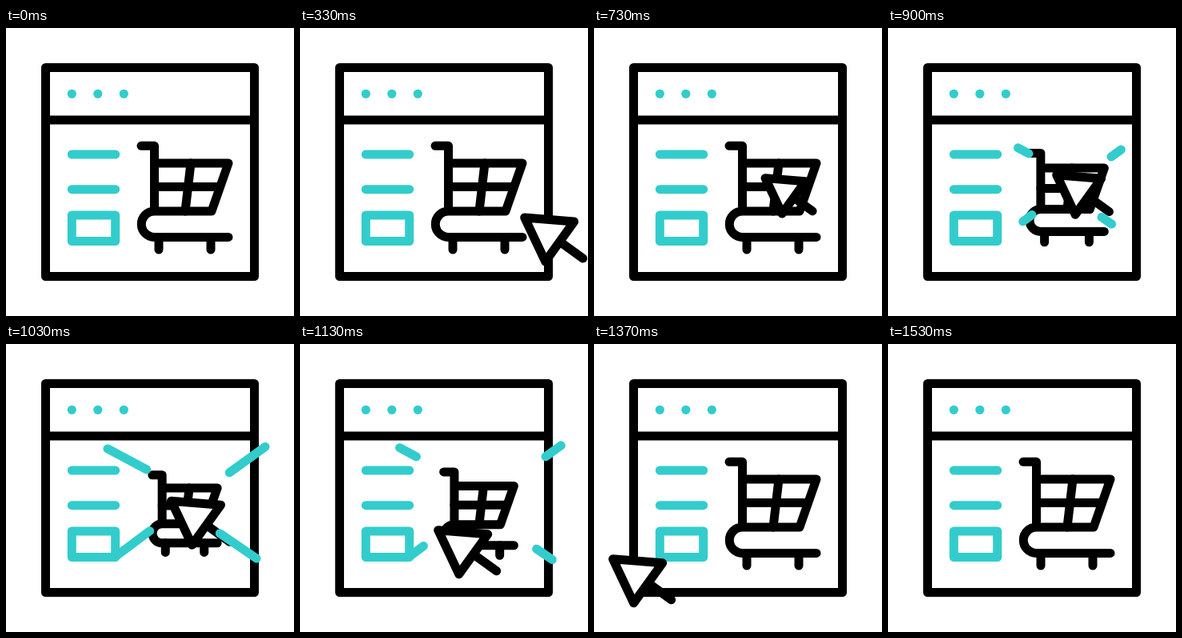
These frames come from a looping animation (360x360 px, 2000 ms). An HTML page:

```html
<!DOCTYPE html>
<html lang="en">
<head>
<meta charset="utf-8">
<title>Online shopping</title>
<style>
  html, body { margin: 0; width: 100%; height: 100%; overflow: hidden; background: #fff; }
  svg { display: block; width: 100%; height: 100%; }
  path, rect { fill: none; stroke: #000; stroke-width: 11; stroke-linecap: round; stroke-linejoin: round; }
  .accent path { stroke: #3cc; }
  circle { fill: #3cc; }
  #cursor path, #cart path { stroke-width: inherit; }
  #cursor .head { fill: #fff; }
</style>
</head>
<body>
<svg viewBox="0 0 360 360">
  <rect x="49.5" y="49.5" width="261" height="261"/>
  <path d="M49.5 115H310.5"/>
  <circle cx="82.3" cy="82.3" r="5.6"/>
  <circle cx="114.8" cy="82.3" r="5.6"/>
  <circle cx="147.3" cy="82.3" r="5.6"/>
  <g class="accent">
    <path d="M82.3 158H136.7M82.3 201.7H136.7M82.3 234H136.7V266.6H82.3Z"/>
  </g>
  <g id="cart">
    <path d="M169 147.3H185.5V229M185.5 169H278L257 229H185.5A16.2 16.2 0 0 0 185.5 261.4H278"/>
    <path d="M185.5 198.5H267M231 169L224 229M191 261.4V277M256 261.4V277"/>
  </g>
  <g id="cursor">
    <path d="M7 3L36 24"/>
    <path class="head" d="M-37 -27L25 -22L-11 28Z"/>
  </g>
  <g id="rays" class="accent"></g>
</svg>
<script>
const LOOP = 2000, STROKE = 11;
const CART_MID = [223.5, 212];
const el = id => document.getElementById(id);
const cart = el('cart'), cursor = el('cursor');

// keys: [ms, value]
const cursorX = [[170, 405], [330, 318], [530, 269], [730, 244], [930, 244], [1030, 243.5], [1230, 150], [1530, -50]];
const cursorY = [[170, 270], [330, 264], [530, 235], [730, 209.5], [800, 208], [900, 208], [1030, 223], [1230, 290], [1530, 300]];
const cursorScale = [[660, 1], [730, 0.81], [800, 0.75], [950, 1]];
const cartScale = [[790, 1], [1040, 0.745], [1230, 0.915], [1330, 1]];
const rayHead = [[860, 0], [1030, 1], [1090, 1.05]];
const rayTail = [[1030, 0], [1200, 1.05]];

// inner end, outer end
const rays = [
  [176, 157, 127, 131],
  [279, 161, 324, 128.5],
  [180, 233.5, 139, 264],
  [267, 236.5, 313, 268]
].map(ends => {
  const path = document.createElementNS('http://www.w3.org/2000/svg', 'path');
  el('rays').append(path);
  return { path, ends };
});

function slope(keys, i) {
  const a = keys[i], b = keys[i + 1];
  return a && b ? (b[1] - a[1]) / (b[0] - a[0]) : null;
}

// harmonic mean of neighbouring slopes keeps the curve free of overshoot
function tangent(keys, i) {
  const l = slope(keys, i - 1), r = slope(keys, i);
  if (l === null) return r;
  if (r === null) return l;
  return l * r > 0 ? 2 * l * r / (l + r) : 0;
}

function sample(keys, t) {
  const last = keys.length - 1;
  if (t <= keys[0][0]) return keys[0][1];
  if (t >= keys[last][0]) return keys[last][1];
  const i = keys.findIndex(k => k[0] > t) - 1;
  const [t0, v0] = keys[i], [t1, v1] = keys[i + 1];
  const d = t1 - t0, u = (t - t0) / d, w = 1 - u;
  return v0 * w * w * (1 + 2 * u) + v1 * u * u * (3 - 2 * u)
    + d * u * w * (tangent(keys, i) * w - tangent(keys, i + 1) * u);
}

function place(node, x, y, scale, pivot = [0, 0]) {
  node.setAttribute('transform', `translate(${x} ${y}) scale(${scale}) translate(${-pivot[0]} ${-pivot[1]})`);
  node.setAttribute('stroke-width', STROKE / scale);
  node.style.strokeWidth = STROKE / scale;
}

function draw(t) {
  place(cart, ...CART_MID, sample(cartScale, t), CART_MID);
  place(cursor, sample(cursorX, t), sample(cursorY, t), sample(cursorScale, t));
  const head = sample(rayHead, t), tail = sample(rayTail, t);
  for (const { path, ends: [x0, y0, x1, y1] } of rays) {
    const at = u => `${x0 + (x1 - x0) * u} ${y0 + (y1 - y0) * u}`;
    path.setAttribute('d', head > tail ? `M${at(tail)}L${at(head)}` : '');
  }
}

function tick() {
  draw(performance.now() % LOOP);
  requestAnimationFrame(tick);
}
tick();
</script>
</body>
</html>
```
